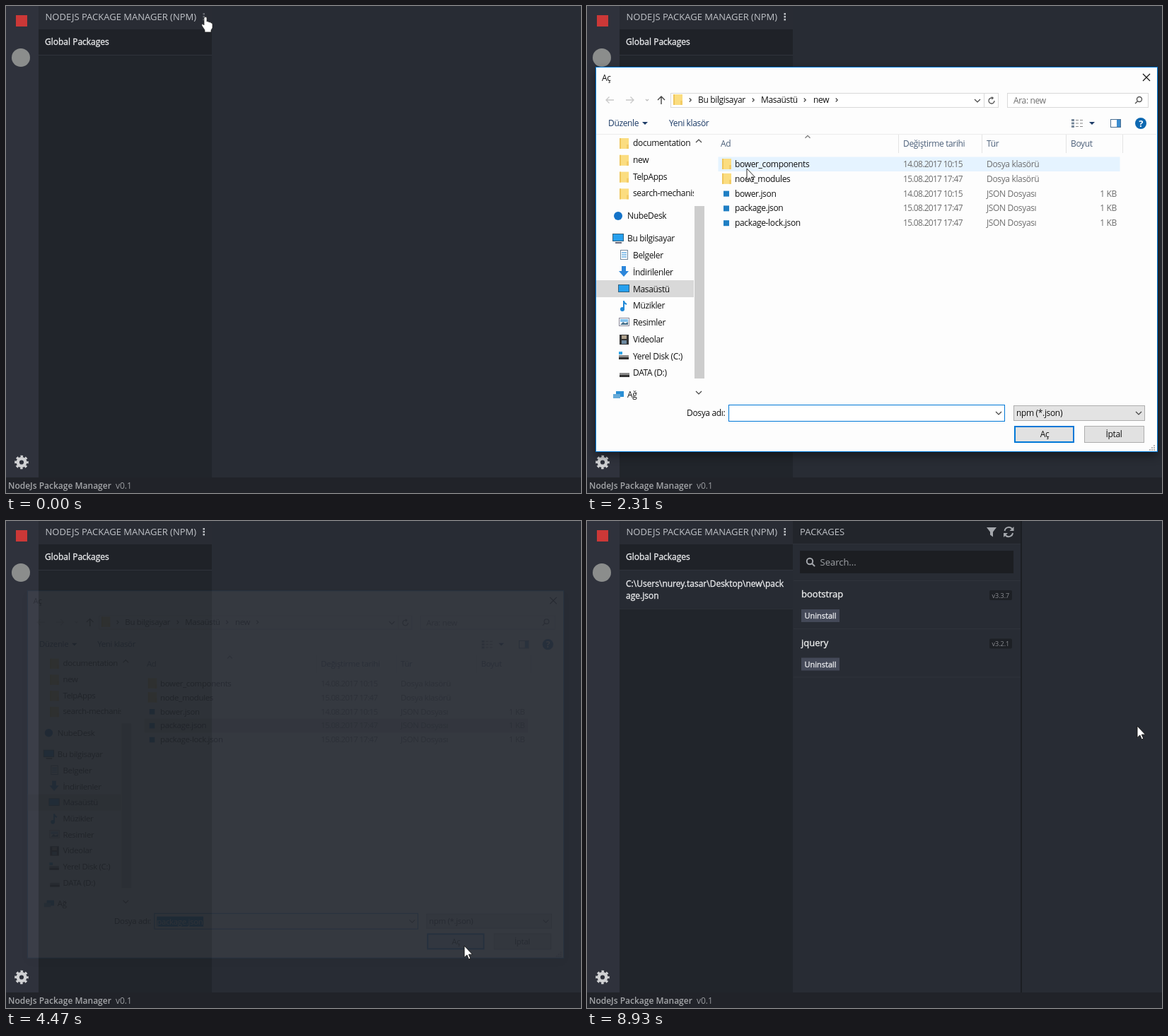
An HTML page that plays this animation: 813 by 689 pixels, repeating every 9.24 s.

```html
<!DOCTYPE html>
<html lang="en">
<head>
<meta charset="utf-8">
<title>Package manager</title>
<style>
html, body { margin: 0; width: 100%; height: 100%; overflow: hidden; background: #282c34; }
svg { display: block; width: 100%; height: 100%; font: 12px "Open Sans", "Noto Sans", sans-serif; }
text { white-space: pre; }
#dialog text { letter-spacing: -.35px; }
#dialog .date { letter-spacing: -.7px; }
#frame { filter: drop-shadow(0 5px 7px rgba(0, 0, 0, .45)); }
</style>
</head>
<body>
<svg id="stage" viewBox="0 0 813 689"></svg>
<script>
const LOOP = 9240;
const rect = (x, y, w, h, fill, extra = '') =>
  `<rect x="${x}" y="${y}" width="${w}" height="${h}" fill="${fill}" ${extra}/>`;
const box = (x, y, w, h, fill, stroke, extra = '') =>
  rect(x + .5, y + .5, w - 1, h - 1, fill, `stroke="${stroke}" ${extra}`);
const text = (x, y, s, fill = '#111', size = 12, extra = '') =>
  `<text x="${x}" y="${y}" fill="${fill}" font-size="${size}" ${extra}>${s}</text>`;
// Slightly heavier text with the widths of the regular weight
const firm = (x, y, s, fill, size = 12, extra = '') =>
  text(x, y, s, fill, size, `stroke="${fill}" stroke-width=".35" ${extra}`);
const path = (d, stroke, width = 1, fill = 'none') =>
  `<path d="${d}" stroke="${stroke}" stroke-width="${width}" fill="${fill}"/>`;
const disc = (x, y, r, fill, extra = '') => `<circle cx="${x}" cy="${y}" r="${r}" fill="${fill}" ${extra}/>`;
const group = (id, body, extra = '') => `<g id="${id}" ${extra}>${body}</g>`;

// Chevron centred on x, y
const chevron = (x, y, dir, s = 4, stroke = '#444') => path({
  up: `M${x - s} ${y + s / 2}l${s} ${-s}l${s} ${s}`,
  down: `M${x - s} ${y - s / 2}l${s} ${s}l${s} ${-s}`,
  right: `M${x - s / 2} ${y - s}l${s} ${s}l${-s} ${s}`
}[dir], stroke, 1.2);
const triangle = (x, y, fill) => path(`M${x - 4} ${y - 2}h8l-4 4z`, 'none', 0, fill);
const folder = (x, y) => rect(x, y, 13, 15, '#fbdd80') + rect(x, y, 2, 15, '#efc65c') + rect(x + 10, y + 9, 3, 6, '#f3cc66');
const lens = (x, y, r, stroke, width, dir) =>
  disc(x, y, r, 'none', `stroke="${stroke}" stroke-width="${width}"`) +
  path(`M${x + dir * r * .7} ${y + r * .7}l${dir * r} ${r}`, stroke, width);
const reload = (x, y, r, stroke, width) =>
  path(`M${x + r} ${y}A${r} ${r} 0 1 1 ${x + r * .3} ${y - r * .95}`, stroke, width) +
  path(`M${x} ${y - r * 1.5}l${r * .8} ${r * .5}l${-r * .7} ${r * .7}z`, 'none', 0, stroke);

function app() {
  return rect(0, 0, 813, 689, '#282c34') + rect(0, 0, 46, 667, '#2f323c') +
    rect(46, 0, 245, 33, '#292c34') + rect(46, 33, 245, 634, '#21252b') +
    rect(46, 33, 245, 36, '#1f2228') + rect(46, 69, 245, 1, '#30343c') +
    rect(14, 13, 16, 16, '#cb3837') + disc(21, 73, 13, '#8b8d8c') +
    disc(22, 645.5, 5.3, 'none', 'stroke="#d0d1d3" stroke-width="4.4"') +
    disc(22, 645.5, 8.3, 'none', 'stroke="#d0d1d3" stroke-width="3" stroke-dasharray="3.4 3.119" stroke-dashoffset="1.7"') +
    text(55.5, 20, 'NODEJS PACKAGE MANAGER (NPM)', '#c0c3c8', 13) +
    group('dots', [11, 15, 19].map(y => rect(278.5, y - 1, 2.5, 2.5, '#c0c3c8')).join('')) +
    firm(55, 55, 'Global Packages', '#e9eaec') +
    group('project', rect(46, 70, 245, 54, '#272b33') + rect(46, 124, 245, 1, '#2b2f37') +
      firm(55, 93, 'C:\\Users\\nurey.tasar\\Desktop\\new\\pack', '#e9eaec') + firm(55, 110, 'age.json', '#e9eaec')) +
    group('packages', packages()) +
    rect(0, 667, 813, 22, '#212329') +
    text(3, 683, 'NodeJs Package Manager', '#a4a6a9', 12, 'font-weight="600"') + text(155, 683, 'v0.1', '#999b9f');
}

function packages() {
  const item = (y, name, version) =>
    firm(303, y + 24, name, '#eceded', 13) + rect(569, y + 14, 32, 14, '#1d2025', 'rx="2"') +
    text(572.5, y + 24.5, version, '#8b8d92', 9) + rect(303, y + 41, 54, 18, '#444958') +
    firm(307.5, y + 54, 'Uninstall', '#e6e7ea', 11) + rect(292, y + 68, 321, 1, '#2f333b');
  return rect(291, 0, 322, 32, '#22252b') + rect(291, 32, 322, 1, '#2e3239') + rect(613, 0, 2, 667, '#1b1e23') +
    text(301, 20, 'PACKAGES', '#c0c3c8', 13) +
    path('M565 9h14l-5 6.5v7l-4-3v-4z', 'none', 0, '#a4a7ac') +
    path('M590.5 14a6 6 0 0 1 10.5-3M602 17a6 6 0 0 1-10.5 3', '#a4a7ac', 2) +
    path('M603.5 8v6h-6zM589 23v-6h6z', 'none', 0, '#a4a7ac') +
    rect(301, 42, 302, 32, '#1c1e22') + lens(315, 57, 4.2, '#a4a7ac', 2, 1) +
    text(329.5, 63, 'Search...', '#a0a3a7', 13) + rect(292, 84, 321, 1, '#2f333b') +
    item(84, 'bootstrap', 'v3.3.7') + item(152.5, 'jquery', 'v3.2.1');
}

const files = [
  ['bower_components', '14.08.2017 10:15'], ['node_modules', '15.08.2017 17:47'],
  ['bower.json', '14.08.2017 10:15'], ['package.json', '15.08.2017 17:47'], ['package-lock.json', '15.08.2017 17:47']
];
const rowTop = i => 213 + i * 20.8;

function fileRow([name, date], i) {
  const y = rowTop(i), json = i > 1, grey = '#6d6d6d';
  return rect(185.5, y + .5, 568, 20.5, 'none', `id="row${i}"`) +
    (json ? rect(193, y + 7, 8, 8, '#1f7fc4') : folder(191, y + 3)) +
    text(209, y + 15, name) + text(447, y + 15, date, grey, 12, 'class="date"') +
    text(565, y + 15, json ? 'JSON Dosyası' : 'Dosya klasörü', grey) +
    (json ? text(749, y + 15, '1 KB', grey, 12, 'text-anchor="end"') : '');
}

function sidebar() {
  const blue = '#1e88d8';
  const screen = (x, y) => box(x, y, 16, 11, '#26a0ee', '#31617f');
  const disk = (x, y) => rect(x, y, 14, 6, '#8b8b8b') + rect(x, y + 3, 14, 3, '#333');
  const names = ['Belgeler', 'İndirilenler', 'Masaüstü', 'Müzikler', 'Resimler', 'Videolar', 'Yerel Disk (C:)', 'DATA (D:)'];
  return rect(13, 388, 138, 24, '#d9d9d9') +
    ['documentation', 'new', 'TelpApps', 'search-mechanis'].map((s, i) =>
      folder(46, 187 + i * 23.8) + text(65, 198 + i * 23.8, s, '#111', 12, 'clip-path="url(#side)"')).join('') +
    disc(44, 297, 6, '#1473c8') + text(57, 301, 'NubeDesk') +
    screen(36, 322) + rect(40, 334, 9, 2, '#667') + text(57, 333, 'Bu bilgisayar') +
    names.map((s, i) => text(65, 357 + i * 23.75, s)).join('') +
    box(47, 345, 11, 14, '#fff', '#73879a') + path('M49 349h7m-7 3h7m-7 3h7', blue) +
    path('M49 368h6v7h4l-7 8l-7-8h4z', 'none', 0, '#2d87db') + screen(44, 394) +
    path('M52 430v-13q0 3 4 5', blue, 2) + disc(50, 429, 3, blue) +
    box(45, 441, 15, 12, '#fff', '#889') + rect(47, 443, 11, 4, '#83c2ee') + path('M47 451l4-4l3 2l4-2v4z', 'none', 0, '#47708b') +
    rect(46, 465, 13, 14, '#333') + rect(49, 466, 7, 5, '#b0a28d') + rect(49, 473, 7, 5, '#6d8aa0') +
    disk(45, 494) + rect(45, 489, 5, 4, '#2da4e8') + disk(46, 519) +
    rect(41, 545, 11, 8, '#2a8fd5') + rect(37, 549, 10, 6, '#66aad8') + text(57, 554, 'Ağ') +
    chevron(158, 191, 'up') + chevron(158, 547, 'down') + rect(152, 283, 14, 244, '#cdcdcd');
}

function content() {
  const ink = '#1b3a66', head = '#4c607a';
  return path('M38 133h-11m4.5-4.5l-4.5 4.5l4.5 4.5M55 133h11m-4.5-4.5l4.5 4.5l-4.5 4.5', '#c9c9c9', 1.3) +
    chevron(85, 133, 'down', 2, '#bbb') + path('M105 139v-11m-5 5l5-5l5 5', '#444', 1.4) +
    box(118, 123, 464, 21, '#fff', '#d9d9d9') + rect(561, 123, 1, 21, '#d9d9d9') + folder(122, 125) +
    [146, 235, 308, 353].map(x => chevron(x, 133, 'right', 2.5)).join('') +
    text(157, 137, 'Bu bilgisayar') + text(246, 137, 'Masaüstü') + text(320, 137, 'new') +
    chevron(552, 134, 'down') + reload(572, 134, 4, '#555', 1.3) +
    box(594, 123, 200, 21, '#fff', '#d9d9d9') + text(603, 138, 'Ara: new', '#6d6d6d') + lens(781, 132, 3.5, '#555', 1.4, -1) +
    text(30, 170, 'Düzenle', ink) + triangle(82, 166, ink) + text(116, 170, 'Yeni klasör', ink) +
    path('M685 161.5h4m-4 4.5h4m-4 4.5h4', '#77889a', 3) + path('M691 161.5h4m2 0h4m-10 4.5h4m2 0h4m-10 4.5h4m2 0h4', '#8a8a8a') +
    triangle(714, 166, ink) + box(740, 160, 15, 12, '#fff', '#4a6f92') + rect(749, 161, 5, 10, '#3b8dd0') +
    disc(783, 166, 8, '#0d68b1') + text(780.3, 170.5, '?', '#fff', 13, 'font-weight="700"') +
    rect(13, 181, 792, 1, '#ececec') + sidebar() +
    [440, 558, 677, 757].map(x => rect(x, 182, 1, 26, '#e3e3e3')).join('') + chevron(312, 185, 'up', 3.5, '#777') +
    text(189, 199, 'Ad', head) + text(447, 199, 'Değiştirme tarihi', head) + text(565, 199, 'Tür', head) + text(684, 199, 'Boyut', head) +
    files.map(fileRow).join('') + text(141, 580, 'Dosya adı:') +
    box(200, 564, 391, 24, '#fff', '#0078d7', 'id="field"') + rect(204, 569, 69, 15, '#0078d7', 'id="mark"') +
    text(204, 581, 'package.json', '#111', 12, 'id="name"') + chevron(582, 576, 'down') +
    box(603, 565, 186, 22, '#e3e3e3', '#adadad') + text(607, 580, 'npm (*.json)') + chevron(780, 576, 'down') +
    rect(605, 595, 83, 22, '#e1e1e1', 'stroke="#0078d7" stroke-width="2" id="open"') + text(647, 610, 'Aç', '#111', 12, 'text-anchor="middle"') +
    box(703, 594, 85, 24, '#e1e1e1', '#adadad') + text(745, 610, 'İptal', '#111', 12, 'text-anchor="middle"') +
    [0, 1, 2].map(i => [...Array(i + 1).keys()].map(j => rect(801 - j * 3, 621 + i * 3, 2, 2, '#b5b5b5')).join('')).join('') +
    group('tip', box(235, 304, 192, 45, '#fff', '#bbb') + ['Tür: JSON Dosyası', 'Boyut: 385 bayt', 'Değiştirme tarihi: 15.08.2017 17:47']
      .map((s, i) => text(240, 317 + i * 13, s, '#575757', 11)).join(''));
}

function skeleton() {
  const pale = '#fafafa';
  return rect(13, 555, 793, 75, '#eee') + rect(150, 182, 17, 373, '#ececec') + rect(151, 282, 15, 245, '#c4c4c4') +
    chevron(158, 191, 'up') + chevron(158, 547, 'down') +
    [[140, 568, 54, 15], [200, 564, 391, 24], [603, 565, 186, 22], [603, 593, 87, 26], [703, 593, 87, 26], [789, 613, 17, 17]]
      .map(r => rect(...r, pale)).join('');
}

document.getElementById('stage').innerHTML =
  '<clipPath id="side"><rect x="13" y="182" width="138" height="370"/></clipPath>' + app() +
  group('menu', box(122, 33, 158, 81, '#282c34', '#1b1e23') + rect(123, 34, 156, 39, '#363b47', 'id="hover"') +
    text(134, 57, 'Add Project', '#d4d6da') + text(134, 98, 'New Project', '#d4d6da')) +
  group('dialog', box(12, 86, 795, 545, '#fdfdfd', '#0078d7', 'id="frame"') +
    text(21, 106, 'Aç') + path('M786 96l10 10m0-10l-10 10', '#111', 1.2) +
    group('skeleton', skeleton()) + group('content', content())) +
  group('wait', rect(0, 0, 813, 689, '#000', 'opacity=".47"') + rect(380, 296, 179, 97, '#000', 'opacity=".5" rx="2"') +
    disc(469, 330.5, 9, 'none', 'stroke="#3c3d3f" stroke-width="2"') +
    group('spin', path('M478 330.5A9 9 0 0 1 469 339.5', '#e4e4e4', 2)) +
    firm(469, 364, 'Please wait...', '#d6d6d6', 13, 'text-anchor="middle"')) +
  group('cursor',
    group('hand', path('M-2 1.5Q0-1 2 1.5V7Q4 6 5 8Q7 7 8 9Q10 8.5 10 11V16L8 19V22H-1V19L-5 13Q-6 10-4 10.5L-2 12Z', '#222', .7, '#fff')) +
    group('arrow', path('M0 0V16.5L3.8 13L6.3 19L8.8 18L6.3 12.2H11.5Z', '#111', .9, '#fff')));

const el = {};
document.querySelectorAll('[id]').forEach(e => el[e.id] = e);
const show = (id, on) => el[id].style.opacity = +on;
const fill = (id, colour) => el[id].setAttribute('fill', colour);

// Progress through n even steps, the first at a and the last at b
const steps = (t, a, b, n) => t < a ? 0 : Math.min(1, (Math.floor((t - a) / (b - a) * (n - 1) + 1e-6) + 1) / n);
const smooth = k => k * k * (3 - 2 * k);

// Pointer moves: from, to, steps, x, y
const moves = [
  [760, 1040, 5, 234, 50], [1740, 2310, 8, 226, 230], [2390, 2740, 6, 235, 283],
  [3480, 4010, 8, 648, 601], [4890, 5340, 7, 117, 84], [6770, 7560, 12, 778, 290]
];

function pointer(t) {
  let x = 282, y = 15;
  for (const [a, b, n, tx, ty] of moves) {
    const k = smooth(steps(t, a, b, n));
    x += (tx - x) * k;
    y += (ty - y) * k;
  }
  return [x, y];
}

function drawDialog(t, x, y) {
  let alpha = 1, scale = 1;
  if (t < 1580) [alpha, scale] = [.3, .95];
  else if (t < 1660) [alpha, scale] = [.67, .982];
  else if (t < 1740) [alpha, scale] = [.92, .996];
  else if (t >= 4470) [alpha, scale] = [.06, .955];
  else if (t >= 4370) [alpha, scale] = [.55, .98];
  if (t < 1500 || t >= 4590) alpha = 0;
  show('dialog', alpha);
  el.dialog.setAttribute('transform', `translate(409.5 358.5) scale(${scale}) translate(-409.5 -358.5)`);
  show('skeleton', t < 1740);
  show('content', t >= 1740);

  const picked = t >= 2740, clicked = t >= 4090;
  files.forEach((_, i) => {
    const over = x > 185 && x < 754 && y >= rowTop(i) && y < rowTop(i + 1);
    const chosen = picked && i === 3;
    fill('row' + i, chosen ? clicked ? '#d9d9d9' : '#cce8ff' : over ? '#e5f3ff' : 'none');
    el['row' + i].setAttribute('stroke', chosen && !clicked ? '#99d1ff' : 'none');
  });
  show('name', picked);
  show('mark', clicked);
  fill('name', clicked ? '#fff' : '#111');
  el.field.setAttribute('stroke', picked && !clicked ? '#7a7a7a' : '#0078d7');
  fill('open', clicked ? '#cce4f7' : t >= 4010 ? '#e5f1fb' : '#e1e1e1');
  show('tip', t < 3130 ? 0 : 1 - steps(t, 3270, 3410, 3));
}

function draw(t) {
  const [x, y] = pointer(t);
  show('dots', t < 60 ? .4 : 1);
  show('menu', t >= 370 && t < 1270);
  show('hover', t >= 970);
  drawDialog(t, x, y);
  show('project', t >= 4590);
  show('packages', t >= 7710);
  show('wait', steps(t, 5800, 6090, 5) - steps(t, 8650, 8930, 5));
  el.spin.setAttribute('transform', `rotate(${180 + (t - 7600) * .36} 469 330.5)`);
  el.cursor.setAttribute('transform', `translate(${x} ${y})`);
  const hand = t < 1740 || t >= 5340 && t < 6090;
  show('hand', hand);
  show('arrow', !hand);
}

const start = performance.now();
function tick() {
  draw((performance.now() - start) % LOOP);
  requestAnimationFrame(tick);
}
tick();
</script>
</body>
</html>
```
